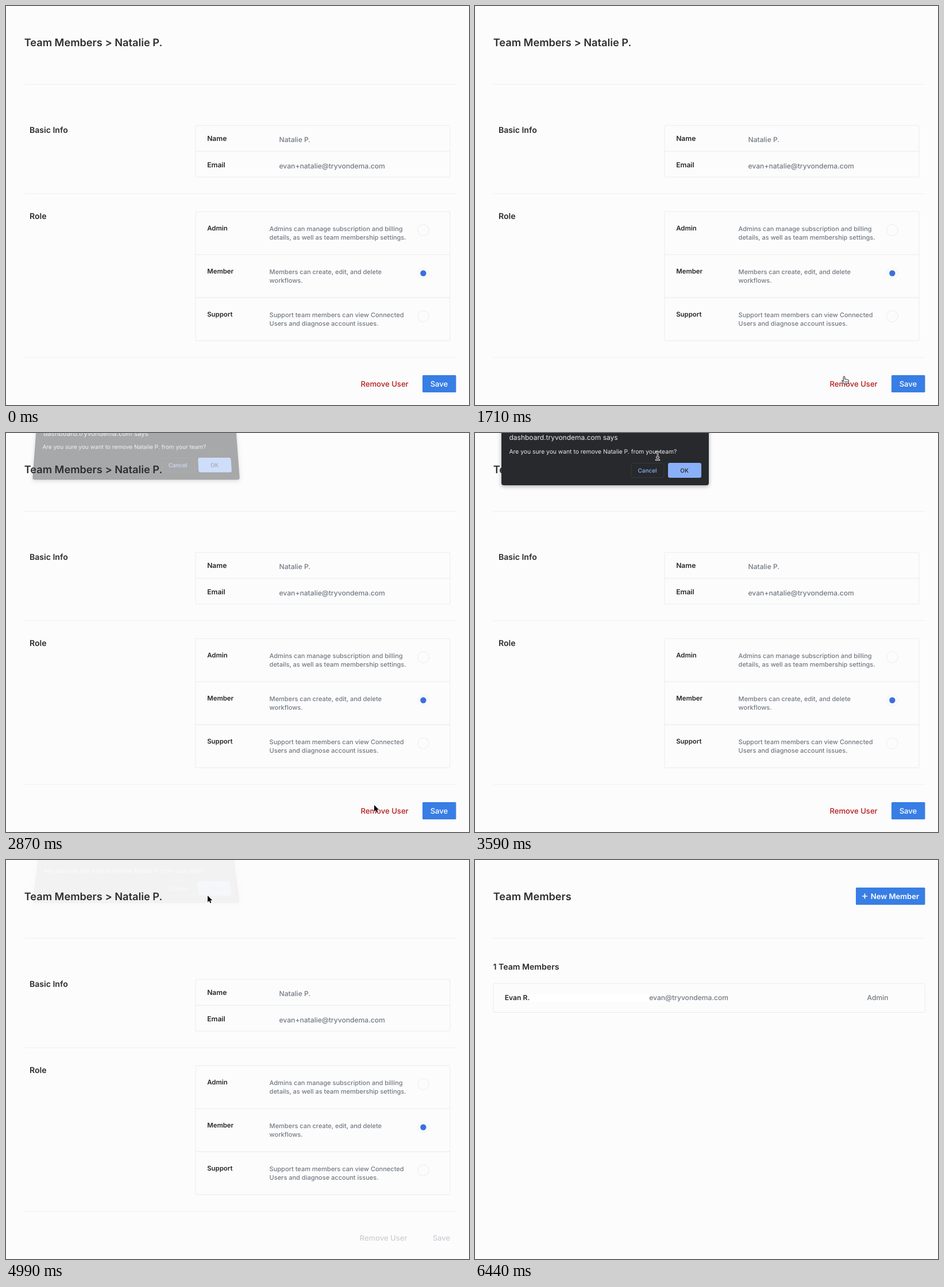
An HTML page for the animation above (8.05 s loop, 806 by 695 pixels).

```html
<!DOCTYPE html>
<html lang="en">
<head>
<meta charset="utf-8">
<title>Remove a team member</title>
<style>
  html, body { margin: 0; width: 100%; height: 100%; overflow: hidden; background: #fcfcfc; }
  svg { display: block; position: absolute; left: 0; top: 0; }
  text { font-family: Inter, "Open Sans", sans-serif; text-rendering: geometricPrecision; }
  .title { font-size: 18.2px; font-weight: 600; fill: #2d2e30; }
  .head { font-size: 14.1px; font-weight: 600; fill: #2a2b2d; }
  .label { font-size: 12.1px; font-weight: 600; fill: #252628; }
  .role { font-size: 11.4px; font-weight: 600; fill: #252628; }
  .value { font-size: 12.1px; font-weight: 500; fill: #727983; }
  .desc { font-size: 11px; font-weight: 500; fill: #727983; }
  .btn { font-size: 13.1px; font-weight: 500; }
  .strong { font-weight: 600; }
  .mid { text-anchor: middle; }
  .line { stroke: #eceff1; fill: none; }
  .box { stroke: #e7ecf0; fill: none; }
  .faint { stroke: #eff2f6; }
  .blue { fill: #387ee4; }
  #dialog {
    position: absolute; left: 46px; top: -30px; width: 361px; height: 121px;
    background: #28292d; border-radius: 4px; transform-origin: 50% 100%;
    box-shadow: 0 2px 7px rgba(0, 0, 0, .32);
  }
  .ask { font-size: 10.3px; fill: #e8eaed; }
  .small { font-size: 10px; font-weight: 500; text-anchor: middle; }
</style>
</head>
<body>
<svg width="806" height="695" viewBox="0 0 806 695">
  <path class="line" d="M32 136.5H784"/>

  <g id="detail">
    <text class="title" x="31.7" y="69.5">Team Members &gt; Natalie P.</text>
    <path class="line" d="M32 327H784M32 612H784"/>

    <text class="head" x="40.9" y="221">Basic Info</text>
    <rect class="box" x="330" y="208" width="443" height="90" rx="2"/>
    <path class="box" d="M330 253H773"/>
    <text class="label" x="350.2" y="235.2">Name</text>
    <text class="value" x="475.5" y="237.2">Natalie P.</text>
    <text class="label" x="350.2" y="280.6">Email</text>
    <text class="value" x="475.5" y="282.5">evan+natalie@tryvondema.com</text>

    <text class="head" x="40.9" y="371.3">Role</text>
    <rect class="box" x="330" y="358" width="443" height="225" rx="2"/>
    <path class="box" d="M330 433H773"/>
    <path d="M330 508H773" stroke="#e2e7f0"/>
    <g id="roles"></g>

    <g id="active">
      <text class="btn" x="617.4" y="662.6" fill="#b5191b">Remove User</text>
      <rect class="blue" x="725" y="643" width="58.5" height="30" rx="1.5"/>
      <text class="btn mid" x="754" y="662.6" fill="#fff">Save</text>
    </g>
    <g id="busy" fill="#cbcfd5">
      <text class="btn mid" x="657" y="662.6">Remove User</text>
      <text class="btn mid" x="758" y="662.6">Save</text>
    </g>
  </g>

  <g id="list">
    <text class="title" x="31.7" y="69.5">Team Members</text>
    <rect class="blue" x="663" y="48" width="120.5" height="30" rx="1.5"/>
    <path d="M674 63h9M678.5 58.5v9" stroke="#fff" stroke-width="1.7"/>
    <text class="btn strong" x="688.7" y="67.7" fill="#fff">New Member</text>
    <text class="head" x="31.5" y="191">1 Team Members</text>
    <rect class="box" x="32" y="215" width="751.5" height="50.5" rx="2"/>
    <rect x="96" y="234" width="207" height="13" fill="#fff"/>
    <text class="label" x="51.8" y="244.3">Evan R.</text>
    <text class="value" x="303.2" y="244.3">evan@tryvondema.com</text>
    <text class="value" x="682.5" y="244.3">Admin</text>
  </g>
</svg>

<div id="dialog">
  <svg width="361" height="121" viewBox="46 -30 361 121">
    <text x="59.5" y="12.2" font-size="12" fill="#e8eaed">dashboard.tryvondema.com says</text>
    <text class="ask" x="59.5" y="35.5">Are you sure you want to remove Natalie P. from your team?</text>
    <rect x="272" y="52.5" width="57" height="25" rx="3" fill="none" stroke="#38393e"/>
    <text class="small" x="300" y="68.6" fill="#8ab0f6">Cancel</text>
    <rect id="ok" x="336" y="52" width="58" height="26" rx="3"/>
    <text class="small" x="364.5" y="68.6" fill="#202124">OK</text>
  </svg>
</div>

<svg width="806" height="695" viewBox="0 0 806 695">
  <g id="cursor" stroke-linejoin="round" stroke-linecap="round">
    <path id="arrow" d="M0 0V11.4L2.7 9L4.4 13L6.3 12.2L4.6 8.3H8.2Z"
      fill="#000" stroke="#fff" stroke-width="1.4" paint-order="stroke"/>
    <g id="hand" stroke="#111" stroke-width="1">
      <path fill="#fff" d="M-1.3 8.6V1.3a1.3 1.3 0 0 1 2.6 0V5.2q1.4-1 2.4 .3q1.4-.8 2.2 .4q1.6-.5 1.9 1.2V9.5q0 2-1.2 3.6H0q-1-1.8-2.6-3q-1.8-1.6-1.2-2.6q.9-.9 2.5 1.1z"/>
      <path d="M1.4 8.6v2.4M3.4 8.6v2.4M5.4 8.6v2.4" stroke-width=".7"/>
    </g>
    <g id="beam" fill="none">
      <path stroke="#fff" stroke-width="2.6" d="M-3-7Q0-7 0-5Q0-7 3-7M0-5V5M-2 2.5H2M-3 7Q0 7 0 5Q0 7 3 7"/>
      <path stroke="#111" d="M-3-7Q0-7 0-5Q0-7 3-7M0-5V5M-2 2.5H2M-3 7Q0 7 0 5Q0 7 3 7"/>
    </g>
  </g>
</svg>

<script>
const LOOP = 8050;
const $ = id => document.getElementById(id);
const show = (id, on) => { $(id).style.display = on ? '' : 'none'; };

const roles = [
  ['Admin', 'Admins can manage subscription and billing', 'details, as well as team membership settings.'],
  ['Member', 'Members can create, edit, and delete', 'workflows.'],
  ['Support', 'Support team members can view Connected', 'Users and diagnose account issues.']
];
$('roles').innerHTML = roles.map(([name, first, second], i) => {
  const y = 391 + i * 75;
  const picked = name === 'Member';
  const dot = picked ? `<circle cx="726.4" cy="${y - .5}" r="5.2" fill="#3a6fe0"/>` : '';
  return `<text class="role" x="350.2" y="${y + .2}">${name}</text>
    <text class="desc" x="458.6" y="${y + .7}">${first}</text>
    <text class="desc" x="458.6" y="${y + 16.2}">${second}</text>
    <circle class="box${picked ? ' faint' : ''}" cx="726.4" cy="${y - .5}" r="9.8"/>${dot}`;
}).join('');

// Pointer strokes: start, end, number of steps, points on the path
const moves = [
  [870, 1620, 11, [[30, 380], [230, 396], [420, 470], [590, 580], [672, 622], [643, 627]]],
  [1710, 2150, 6, [[642.5, 645], [641, 650], [646, 656]]],
  [2870, 3590, 9, [[641, 648], [590, 575], [470, 390], [360, 150], [318, 40]]],
  [3680, 4030, 6, [[324, 44], [340, 55], [351, 62]]],
  [6000, 6440, 6, [[362, 65], [480, 92], [640, 150], [815, 238]]]
];

// Dialog poses: time, opacity, lift
const poses = [
  [0, 0, 1], [2870, .4, .6], [2960, .9, .15], [3050, 1, 0],
  [4870, .5, .6], [4990, .05, 1], [5530, 0, 1]
];

const last = (rows, t) => rows.filter(r => r[0] <= t).pop();

function spline(pts, u) {
  const s = u * (pts.length - 1);
  const i = Math.min(Math.floor(s), pts.length - 2);
  const f = s - i;
  const at = k => pts[Math.max(0, Math.min(pts.length - 1, k))];
  return [0, 1].map(c => {
    const [a, b, d, e] = [-1, 0, 1, 2].map(k => at(i + k)[c]);
    return b + .5 * f * (d - a + f * (2 * a - 5 * b + 4 * d - e + f * (3 * (b - d) + e - a)));
  });
}

function drawCursor(t) {
  const on = t >= 870 && t < 6440;
  show('cursor', on);
  if (!on) return;
  const [from, to, steps, pts] = last(moves, t);
  const n = steps - 1;
  const u = Math.min(1, Math.floor((t - from) / (to - from) * n + 1e-4) / n);
  const [x, y] = spline(pts, u);
  $('cursor').setAttribute('transform', `translate(${x.toFixed(2)} ${y.toFixed(2)})`);
  const hand = t >= 1600 && t < 2600;
  const beam = t >= 3590 && t < 3680;
  show('hand', hand);
  show('beam', beam);
  show('arrow', !hand && !beam);
}

function drawDialog(t) {
  const [, alpha, lift] = last(poses, t);
  const tilt = -.0007 * lift;
  const style = $('dialog').style;
  style.opacity = alpha;
  style.transform = lift
    ? `translateY(${-16 * lift}px) matrix3d(1,0,0,0, 0,1,0,${tilt}, 0,0,1,0, 0,0,0,1)`
    : 'none';
  $('ok').setAttribute('fill', t >= 4690 ? '#7391c6' : '#8ab0f8');
}

function draw(t) {
  show('detail', t < 5530);
  show('list', t >= 5530);
  show('active', t < 4990);
  show('busy', t >= 4990);
  drawDialog(t);
  drawCursor(t);
}

const start = performance.now();
function tick() {
  draw((performance.now() - start) % LOOP);
  requestAnimationFrame(tick);
}
tick();
</script>
</body>
</html>
```
